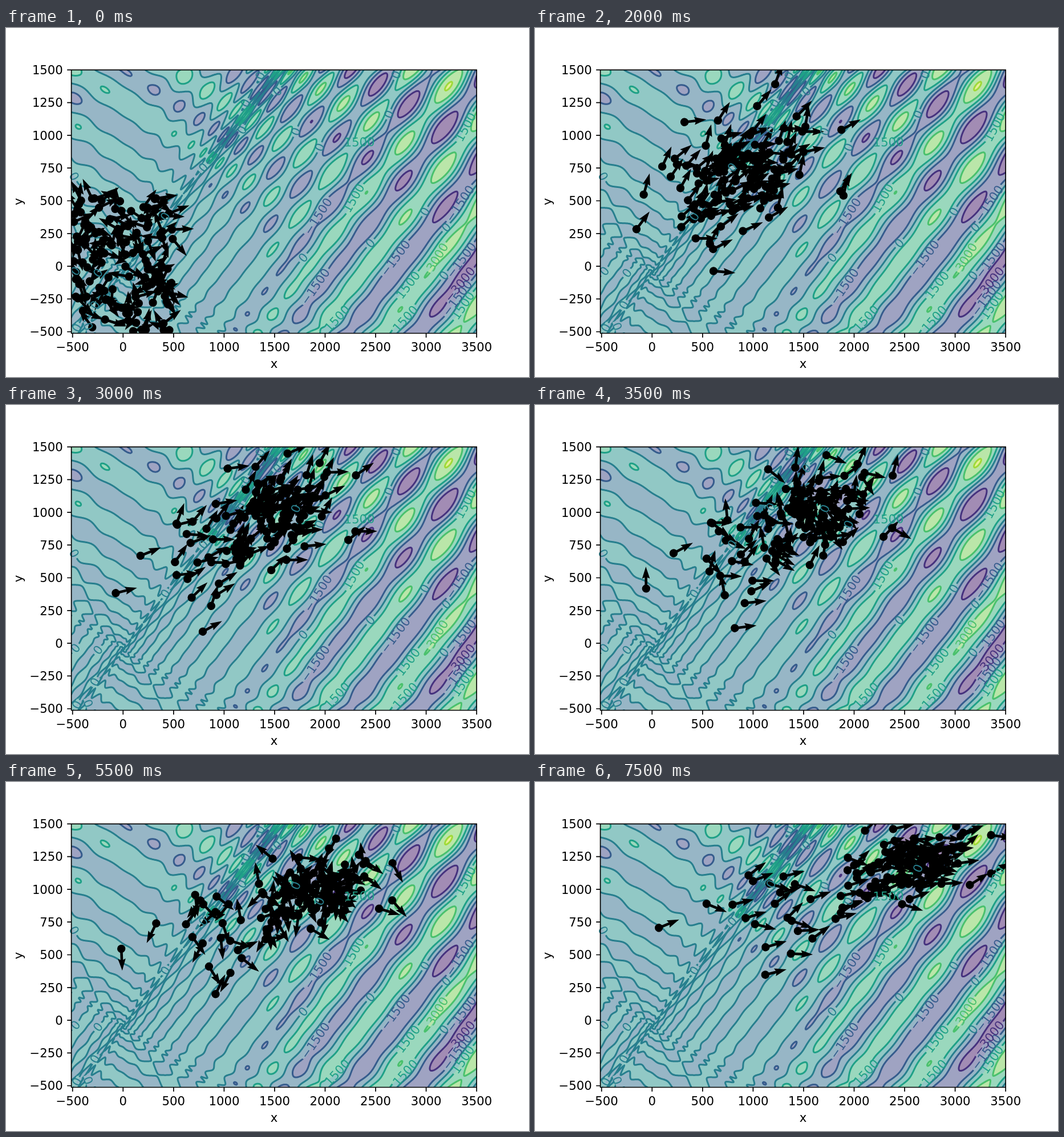
Animation, 917 px wide and 611 px high, one loop 8000 ms. Source, as an HTML page with a canvas:

```html
<!DOCTYPE html>
<html lang="en">
<head>
<meta charset="utf-8">
<title>Particle swarm on the Eggholder function</title>
<style>
html, body { margin: 0; width: 100%; height: 100%; overflow: hidden; background: #fff; }
canvas, svg { position: absolute; left: 0; top: 0; width: 917px; height: 611px; }
text { font: 21.2px "DejaVu Sans", sans-serif; }
.mid { text-anchor: middle; }
.end { text-anchor: end; }
</style>
</head>
<body>
<canvas id="stage" width="917" height="611"></canvas>
<svg id="ink" viewBox="0 0 917 611"></svg>
<script>
// Plot box in pixels; it spans 4012 by 2012 units from (-512, -512)
const L = 114.6, T = 73.3, W = 710.6, H = 461.2;
const KX = W / 4012, KY = H / 2012;
const toX = x => L + (x + 512) * KX;
const toY = y => T + H - (y + 512) * KY;

function eggholder(x, y) {
  const b = y + 47;
  return -b * Math.sin(Math.sqrt(Math.abs(x / 2 + b))) - x * Math.sin(Math.sqrt(Math.abs(x - b)));
}
const heightAt = (px, py) => eggholder((px - L) / KX - 512, (T + H - py) / KY - 512);

// Viridis at the contour levels -4500, -3000 ... 6000
const STEP = 1500, LOW = -4500;
const viridis = [[68,1,84], [70,50,126], [54,92,141], [39,127,142], [31,161,135], [74,193,109], [160,218,57], [253,231,37]];
const lineColor = level => `rgb(${viridis[(level - LOW) / STEP]})`;
// A band takes the mean of its two levels, half transparent over white
const bands = viridis.slice(1).map((c, k) => c.map((v, n) => Math.round((v + viridis[k][n]) / 4 + 127.5)));

// Rough places of the contour labels: x, y pairs per level
const spots = {
  '0': [123, 258, 121, 425, 160, 428, 281, 330, 156, 485, 126, 525, 147, 524, 347, 245, 413, 178, 419, 131,
    448, 84, 477, 112, 507, 181, 550, 209, 682, 81, 671, 151, 638, 376, 520, 401, 734, 321, 771, 348, 768, 433],
  '-1500': [548, 330, 543, 453, 683, 403, 797, 308, 799, 407, 793, 474],
  '-3000': [796, 449],
  '1500': [619, 198, 610, 298, 705, 450, 805, 173, 580, 508, 700, 509, 803, 487],
  '3000': [756, 401]
};
const name = v => String(v).replace('-', '\u2212');

function slope(x, y) {
  const e = .4;
  return [(heightAt(x + e, y) - heightAt(x - e, y)) / (2 * e), (heightAt(x, y + e) - heightAt(x, y - e)) / (2 * e)];
}

// Moves a point onto the contour line nearby
function snap([x, y], level, rounds, reach) {
  for (let k = 0; k < rounds; k++) {
    const [gx, gy] = slope(x, y), g = Math.hypot(gx, gy) || 1;
    const d = Math.max(-reach, Math.min(reach, (level - heightAt(x, y)) / g));
    x += gx / g * d;
    y += gy / g * d;
  }
  return [x, y];
}

function follow(p, level, length, sign) {
  for (let k = 0; k < length; k++) {
    const [gx, gy] = slope(...p), g = sign / (Math.hypot(gx, gy) || 1);
    p = snap([p[0] - gy * g, p[1] + gx * g], level, 1, .5);
  }
  return p;
}

// A label sits on its line and turns with the chord it covers
function makeLabels(g) {
  return Object.entries(spots).flatMap(([key, list]) => {
    const level = +key, half = g.measureText(name(level)).width / 2, out = [];
    for (let i = 0; i < list.length; i += 2) {
      const p = snap([list[i], list[i + 1]], level, 4, 2);
      const a = follow(p, level, half, -1), b = follow(p, level, half, 1);
      const r = Math.atan((b[1] - a[1]) / (b[0] - a[0] || 1e-6));
      out.push({ level, half, x: p[0], y: p[1], r });
    }
    return out;
  });
}

function fillBands(g) {
  const img = g.createImageData(917, 611);
  for (let y = Math.floor(T); y < T + H; y++)
    for (let x = Math.floor(L); x < L + W; x++) {
      const k = Math.floor((heightAt(x + .5, y + .5) - LOW) / STEP);
      img.data.set([...bands[Math.max(0, Math.min(6, k))], 255], (y * 917 + x) * 4);
    }
  g.putImageData(img, 0, 0);
}

// Marching squares; equal steps in x and y keep the grid in line with the diagonal ridge
function contourPath(level, z, cols, rows) {
  const path = new Path2D(), dx = W / cols, dy = H / rows;
  for (let j = 0; j < rows; j++)
    for (let i = 0; i < cols; i++) {
      const n = j * (cols + 1) + i, m = n + cols + 1;
      const above = (z[n] > level) + (z[n + 1] > level) + (z[m + 1] > level) + (z[m] > level);
      if (above % 4 === 0) continue;
      const v = [z[n] - level, z[n + 1] - level, z[m + 1] - level, z[m] - level];
      const hits = [];
      for (let e = 0; e < 4; e++) {
        const a = v[e], b = v[(e + 1) % 4];
        if ((a > 0) === (b > 0)) continue;
        const t = a / (a - b);
        const u = [t, 1, 1 - t, 0][e], w = [0, t, 1, 1 - t][e];
        hits.push([L + (i + u) * dx, T + (j + w) * dy]);
      }
      for (let k = 0; k < hits.length; k += 2) {
        path.moveTo(...hits[k]);
        path.lineTo(...hits[k + 1]);
      }
    }
  return path;
}

// Leaves a gap in a level's line under each of its labels
function cutGaps(g, labels, level) {
  for (const s of labels) {
    if (s.level !== level) continue;
    const w = s.half + 3, h = 5, c = Math.cos(s.r), d = Math.sin(s.r);
    const hole = new Path2D();
    hole.rect(0, 0, 917, 611);
    [[-w, -h], [w, -h], [w, h], [-w, h]].forEach(([u, v], k) =>
      hole[k ? 'lineTo' : 'moveTo'](s.x + u * c - v * d, s.y + u * d + v * c));
    hole.closePath();
    g.clip(hole, 'evenodd');
  }
}

function clipBox(g) {
  g.beginPath();
  g.rect(L, T, W, H);
  g.clip();
}

function drawField(g, labels) {
  fillBands(g);
  const cols = 1003, rows = 503;
  const z = new Float32Array((cols + 1) * (rows + 1));
  for (let j = 0, n = 0; j <= rows; j++)
    for (let i = 0; i <= cols; i++) z[n++] = eggholder(4 * i - 512, 1500 - 4 * j);
  g.lineWidth = 3;
  g.lineCap = 'round';
  for (let level = -3000; level <= 4500; level += STEP) {
    g.save();
    clipBox(g);
    cutGaps(g, labels, level);
    g.strokeStyle = lineColor(level);
    g.stroke(contourPath(level, z, cols, rows));
    g.restore();
  }
}

function drawInk(labels) {
  const put = (x, y, s, cls, extra = '') => `<text x="${x}" y="${y}" class="${cls}" ${extra}>${s}</text>`;
  let out = '', ticks = '';
  for (const s of labels)
    out += put(0, 7.6, name(s.level), 'mid',
      `fill="${lineColor(s.level)}" transform="translate(${s.x} ${s.y}) rotate(${s.r * 180 / Math.PI})"`);
  for (let x = -500; x <= 3500; x += 500) {
    ticks += `M${toX(x)} ${T + H}v7.4`;
    out += put(toX(x), 565.6, name(x), 'mid');
  }
  for (let y = -500; y <= 1500; y += 250) {
    ticks += `M${L} ${toY(y)}h-7.4`;
    out += put(99.8, toY(y) + 7.7, name(y), 'end');
  }
  out += put(470, 595, 'x', 'mid') + put(0, 0, 'y', 'mid', 'transform="translate(28.8 304) rotate(-90)"');
  out += `<path d="M${L} ${T}h${W}v${H}h${-W}z${ticks}" fill="none" stroke="#000" stroke-width="1.7"/>`;
  document.getElementById('ink').innerHTML = out;
}

// Key states of the swarm: time, centre, spread, heading, turn
const keys = [
  [0, 204, 415, 0, 0, 0, 180],
  [1000, 295, 318, 42, 34, 25, 45],
  [2000, 375, 243, 54, 46, 38, 45],
  [3000, 482, 182, 44, 42, 35, 40],
  [4500, 535, 172, 40, 34, 0, 170],
  [6500, 576, 190, 42, 22, 0, 120],
  [7500, 672, 133, 43, 29, 10, 35]
];
const COUNT = 125;

function rnd(i, k) {
  const s = Math.sin(i * 127.1 + k * 311.7) * 43758.5453;
  return s - Math.floor(s);
}
const bell = (i, k) => (rnd(i, k) + rnd(i, k + 1) + rnd(i, k + 2) - 1.5) * 2;

function stateAt(time) {
  const k = Math.max(1, keys.findIndex(s => s[0] >= time));
  const a = keys[k - 1], b = keys[k], f = (time - a[0]) / (b[0] - a[0]);
  return a.map((v, n) => v + (b[n] - v) * f);
}

// Each particle is pulled from its home in the starting square towards the swarm; a few lag behind
function particle(i, time) {
  const [, cx, cy, sx, sy, heading, turn] = stateAt(Math.min(time, 7500));
  const pull = (1 - .9 * rnd(i, 3) ** 6) * Math.min(1, time / 1000);
  const size = .5 + rnd(i, 7);
  const hx = 116 + rnd(i, 1) * 177, hy = 296 + rnd(i, 2) * 237 - (1 - pull) * time / 50;
  return [
    hx + (cx + bell(i, 4) * size * sx - hx) * pull,
    hy + (cy + bell(i, 8) * size * sy - hy) * pull,
    heading + (rnd(i, 12 + time / 500) * 2 - 1) * turn
  ];
}

const arrow = new Path2D('M0-2.3H19.5L17.5-6.8L38.5 0L17.5 6.8L19.5 2.3H0z');
const dot = new Path2D();
dot.arc(0, 0, 7.2, 0, 7);

const field = document.createElement('canvas');
field.width = 917;
field.height = 611;
const fg = field.getContext('2d');
fg.font = '21.2px "DejaVu Sans", sans-serif';
const labels = makeLabels(fg);
drawField(fg, labels);
drawInk(labels);

const g = document.getElementById('stage').getContext('2d');
function draw(time) {
  g.clearRect(0, 0, 917, 611);
  g.drawImage(field, 0, 0);
  g.save();
  clipBox(g);
  for (let i = 0; i < COUNT; i++) {
    const [x, y, a] = particle(i, time);
    g.save();
    g.translate(x, y);
    g.rotate(-a * Math.PI / 180);
    g.fill(dot);
    g.fill(arrow);
    g.restore();
  }
  g.restore();
}

const start = performance.now();
let shown = -1;
function tick() {
  const step = Math.floor((performance.now() - start) % 8000 / 500);
  if (step !== shown) draw((shown = step) * 500);
  requestAnimationFrame(tick);
}
tick();
</script>
</body>
</html>
```
